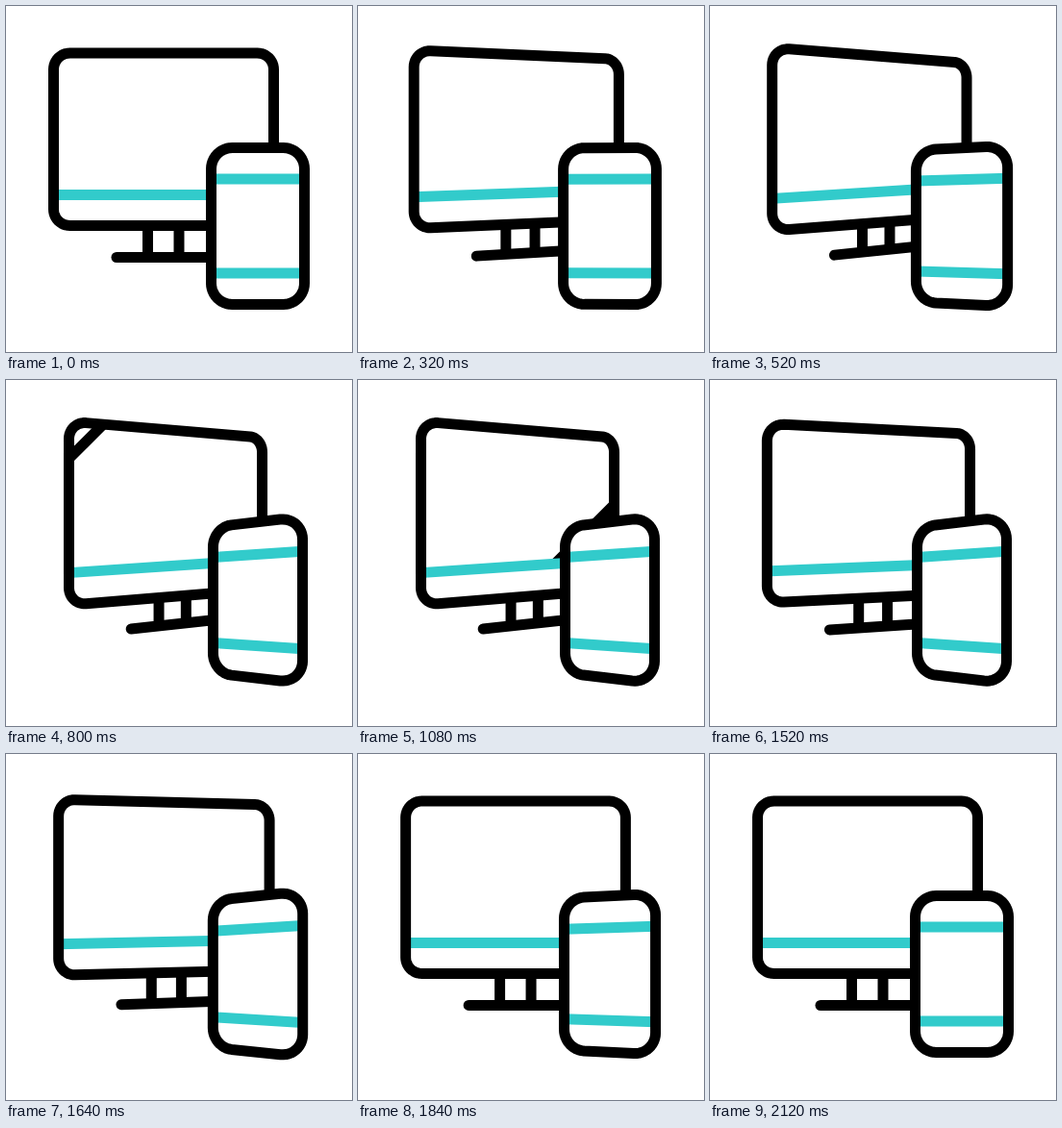
An HTML page with a canvas that plays this animation: 360 px wide and 360 px high, repeating every 2.56 s.

```html
<!DOCTYPE html>
<html lang="en">
<head>
<meta charset="utf-8">
<title>Monitor and phone</title>
<style>
html, body { margin: 0; width: 100%; height: 100%; overflow: hidden; background: #fff; }
canvas { display: block; width: 360px; height: 360px; }
</style>
</head>
<body>
<canvas id="stage"></canvas>
<script>
const LOOP = 2560, STEP = 40, TURN = 600;
const INK = '#000', TEAL = '#32cbcb', LINE = 11;
const canvas = document.getElementById('stage');
const ctx = canvas.getContext('2d');
const ratio = window.devicePixelRatio || 1;
canvas.width = canvas.height = Math.round(360 * ratio);
ctx.scale(ratio, ratio);

const ease = v => {
  const t = Math.min(1, Math.max(0, v));
  return t * t * (3 - 2 * t);
};
const mix = (a, b, p) => a + (b - a) * p;

// 0 = facing front, 1 = fully turned
const turn = (t, start, back) => ease((t - start) / TURN) - ease((t - back) / TURN);

// Perspective turn about a vertical axis; p is the amount
function view(axis, midY, shiftX, squeezeX, squeezeY, depth, p) {
  const a = mix(1, squeezeX, p), b = mix(1, squeezeY, p);
  return (x, y) => {
    const u = x - axis, w = 1 + depth * p * u;
    return [axis + shiftX * p + a * u / w, midY + b * (y - midY) / w];
  };
}
const flat = (x, y) => [x, y];

function trace(map, points, closed) {
  ctx.beginPath();
  points.forEach(([x, y]) => ctx.lineTo(...map(x, y)));
  if (closed) ctx.closePath();
}

function line(map, color, x1, y1, x2, y2, cap = 'butt') {
  trace(map, [[x1, y1], [x2, y2]]);
  ctx.strokeStyle = color;
  ctx.lineCap = cap;
  ctx.stroke();
}

function roundBox(l, t, r, b, rad) {
  const corners = [[r - rad, b - rad], [l + rad, b - rad], [l + rad, t + rad], [r - rad, t + rad]];
  const points = [];
  corners.forEach(([cx, cy], i) => {
    for (let k = 0; k <= 12; k++) {
      const ang = (i + k / 12) * Math.PI / 2;
      points.push([cx + rad * Math.cos(ang), cy + rad * Math.sin(ang)]);
    }
  });
  return points;
}

const screen = roundBox(49.5, 49, 278.5, 228.5, 17);
const glass = [[49.5, 49], [278.5, 49], [278.5, 196.5], [49.5, 196.5]];
const shell = roundBox(213.5, 147.5, 310.5, 310.5, 22);

// A 45 degree stripe that slides over the glass
function drawGlint(map, t) {
  if (t < 740 || t > 1240) return;
  const c = (147.3 + 0.889 * (t - 800)) / 2;
  ctx.save();
  trace(map, glass, true);
  ctx.clip();
  line(flat, INK, c - 250, c + 250, c + 250, c - 250);
  ctx.restore();
}

function drawMonitor(t) {
  const p = turn(t, 0, 1270);
  const map = view(164, 140.2, 11.6, 0.87, 0.963, 0.000833, p);
  const barMap = view(164, 140.2, 11.6, 0.87, 0.942, 0.0011, p);
  const base = shift => (x, y) => {
    const [sx, sy] = map(x, 228.5 + (y - 228.5) * (1 - 0.09 * p));
    return [sx - shift * p, sy];
  };
  line(base(2), INK, 147.5, 228.5, 147.5, 261.5);
  line(base(2), INK, 180, 228.5, 180, 261.5);
  line(base(1), INK, 115, 261.5, 213, 261.5, 'round');
  drawGlint(map, t);
  line(barMap, TEAL, 49.5, 196.5, 278.5, 196.5);
  trace(map, screen, true);
  ctx.strokeStyle = INK;
  ctx.stroke();
}

function drawPhone(t) {
  const p = turn(t, 250, 1520);
  const map = view(262, 229, -3.1, 0.9545, 0.993, -0.00138, p);
  const barMap = view(262, 229, -3.1, 0.9545, 0.967, -0.00138, p);
  trace(map, shell, true);
  ctx.fillStyle = '#fff';
  ctx.fill();
  line(barMap, TEAL, 213.5, 180, 310.5, 180);
  line(barMap, TEAL, 213.5, 278, 310.5, 278);
  trace(map, shell, true);
  ctx.strokeStyle = INK;
  ctx.stroke();
}

function draw(t) {
  ctx.fillStyle = '#fff';
  ctx.fillRect(0, 0, 360, 360);
  ctx.lineWidth = LINE;
  ctx.lineJoin = 'round';
  drawMonitor(t);
  drawPhone(t);
}

const begin = performance.now();
function tick() {
  const t = (performance.now() - begin) % LOOP;
  draw(Math.floor(t / STEP) * STEP);
  requestAnimationFrame(tick);
}
tick();
</script>
</body>
</html>
```
